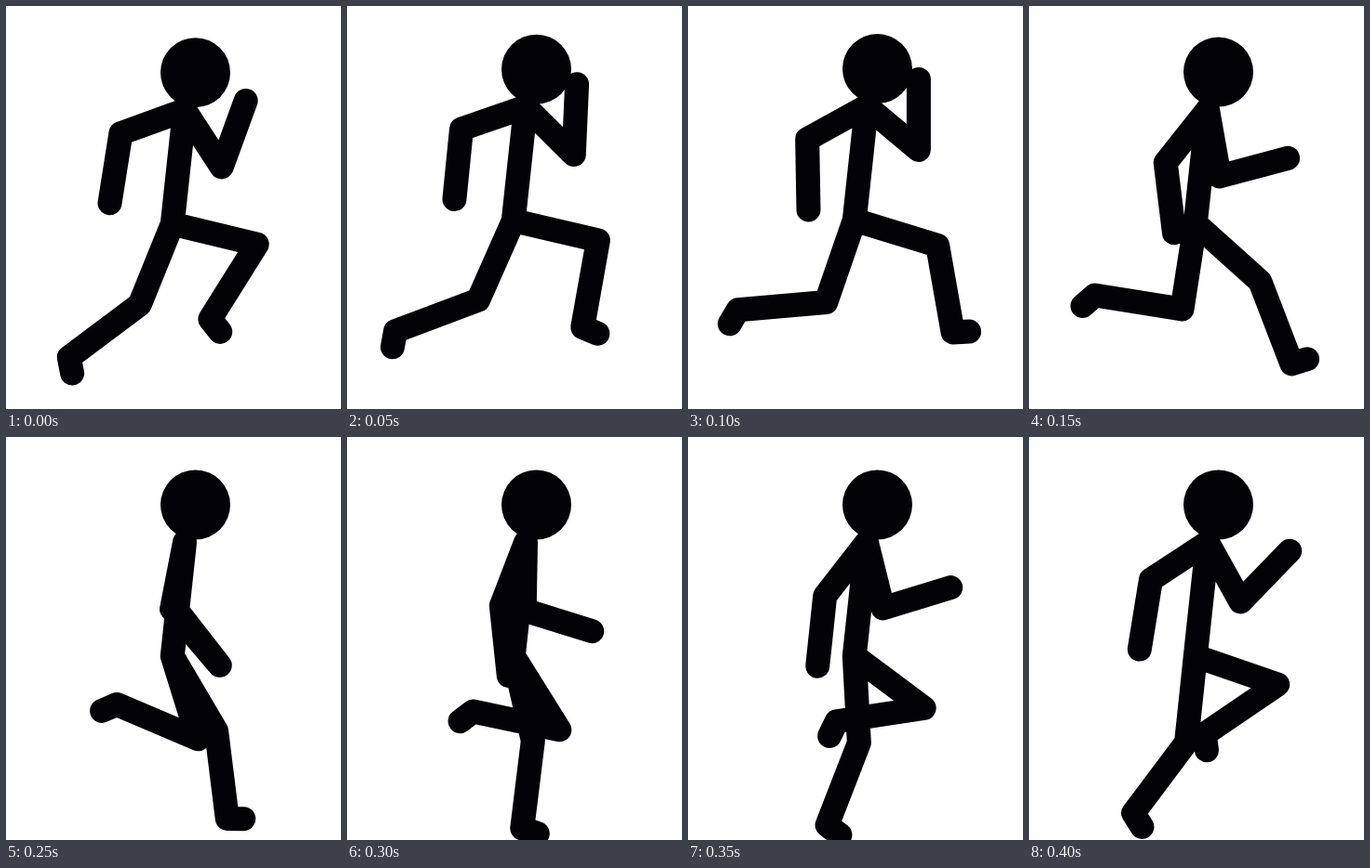
An HTML page with a canvas that plays this animation: 360 px wide and 434 px high, repeating every 0.45 s.

```html
<!DOCTYPE html>
<html lang="en">
<head>
<meta charset="utf-8">
<title>Running stick figure</title>
<style>
  html, body { margin: 0; width: 100%; height: 100%; overflow: hidden; background: #fff; }
  canvas { display: block; }
</style>
</head>
<body>
<canvas id="stage" width="360" height="434"></canvas>
<script>
const ctx = document.getElementById('stage').getContext('2d');
const STEP_MS = 50;
const STRIDE = 9;           // steps until left and right have swapped places
const CYCLE = 2 * STRIDE;   // steps until a limb is back where it began
const INK = '#030206', LIMB = 26, HEAD = 37.5;
const UPPER_ARM = 73, FOREARM = 76, THIGH = 93.5, SHIN = 95, FOOT = 17.5;

// Joint angles in degrees, clockwise from pointing right, at a few steps of the cycle.
const thigh = swing({ 2: 17, 3: 42, 4: 43, 6: 77, 8: 96, 9: 112, 11: 109, 15: 58, 17: 19 });
const shin = swing({ 0: 122, 3: 69, 6: 97, 13: 201, 15: 192 });
const foot = step => 1.3 * shin(step) - 107;
const upperArm = swing({ 0: 160, 2: 151, 4: 105, 6: 91, 8: 61, 9: 57, 11: 40, 12: 80, 15: 111 });
const forearm = swing({ 0: 99, 3: 83, 4: 82, 8: -46, 11: -90, 12: -15, 13: 8, 15: 84 });

// Smooth periodic curve through the given { step: angle } keys.
function swing(keys) {
  const steps = Object.keys(keys).map(Number);
  const n = steps.length;
  const time = i => steps[(i + n) % n] + CYCLE * Math.floor(i / n);
  const value = i => keys[steps[(i + n) % n]];
  const slope = i => (value(i + 1) - value(i - 1)) / (time(i + 1) - time(i - 1));

  return step => {
    let i = -1;
    while (time(i + 1) <= step) i++;
    const span = time(i + 1) - time(i);
    const t = (step - time(i)) / span, u = 1 - t;
    return u * u * (1 + 2 * t) * value(i) + t * t * (3 - 2 * t) * value(i + 1)
      + span * t * u * (u * slope(i) - t * slope(i + 1));
  };
}

function limb([x, y], ...bones) {
  ctx.moveTo(x, y);
  for (const [length, degrees] of bones) {
    const angle = degrees * Math.PI / 180;
    x += length * Math.cos(angle);
    y += length * Math.sin(angle);
    ctx.lineTo(x, y);
  }
}

function draw(step) {
  const headY = 73 - 6 * Math.exp(-(((step - 1.6) / 1.3) ** 2));
  const shoulder = [192, headY + 40.5];
  const hip = [178.8, headY + 163];

  ctx.fillStyle = '#fff';
  ctx.fillRect(0, 0, 360, 434);
  ctx.fillStyle = ctx.strokeStyle = INK;
  ctx.lineWidth = LIMB;
  ctx.lineCap = ctx.lineJoin = 'round';

  ctx.beginPath();
  ctx.moveTo(...shoulder);
  ctx.lineTo(...hip);
  for (const s of [step, step + STRIDE]) {
    limb(shoulder, [UPPER_ARM, upperArm(s)], [FOREARM, forearm(s)]);
    limb(hip, [THIGH, thigh(s)], [SHIN, shin(s)], [FOOT, foot(s)]);
  }
  ctx.stroke();

  ctx.beginPath();
  ctx.arc(203.5, headY, HEAD, 0, 2 * Math.PI);
  ctx.fill();
}

const start = performance.now();
function tick() {
  draw(Math.floor((performance.now() - start) / STEP_MS) % STRIDE);
  requestAnimationFrame(tick);
}
tick();
</script>
</body>
</html>
```
